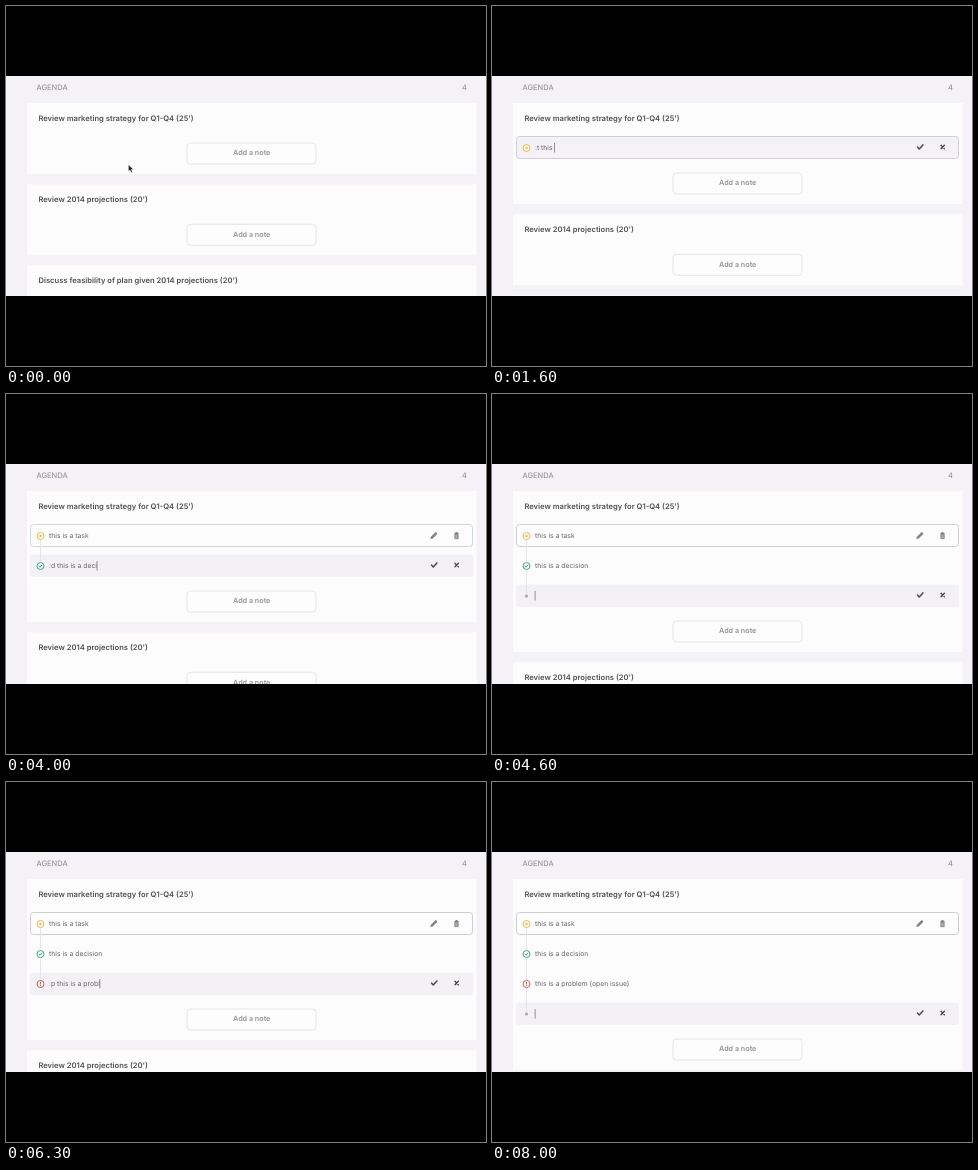
An HTML page for the animation above (8.1 s loop, 480 by 360 pixels).

```html
<!DOCTYPE html>
<html lang="en">
<head>
<meta charset="utf-8">
<title>Agenda notes</title>
<style>
  html, body { margin: 0; width: 100%; height: 100%; overflow: hidden; background: #000; }
  svg { display: block; width: 480px; height: 360px; }
  text { font: 400 6.8px Inter, Lato, sans-serif; fill: #636366; white-space: pre; text-rendering: geometricPrecision; }
  .title { font-weight: 600; font-size: 7.62px; fill: #505054; }
  .add { font-weight: 600; font-size: 7.2px; fill: #939397; text-anchor: middle; }
  .label { font-size: 7.5px; fill: #89878d; }
  .line { fill: none; stroke-linecap: round; stroke-linejoin: round; }
</style>
</head>
<body>
<svg id="stage" viewBox="0 0 480 360"></svg>
<script>
const LOOP = 8100, OPEN = 500, ROW = 30;
const stage = document.getElementById('stage');
const pen = document.createElement('canvas').getContext('2d');

// keys: [time, characters typed]; enter: time the note is saved
const notes = [
  { typed: ':t this is a task', color: '#e9b850', enter: 2400,
    mark: '<circle r="1.2" fill="#e9b850"/>',
    keys: [[1220, 0], [1600, 8.1], [2120, 17]] },
  { typed: ':d this is a decision', color: '#3fa88a', enter: 4400,
    mark: '<path class="line" d="M-1.5 0l1.1 1.2 1.9-2.2" stroke="#3fa88a"/>',
    keys: [[2930, 0], [4000, 17.2], [4260, 21]] },
  { typed: ':p this is a problem (open issue)', color: '#d65f5d', enter: 7700,
    mark: '<path class="line" d="M0-1.7v1.8M0 1.6v.1" stroke="#d65f5d"/>',
    keys: [[4850, 0], [5600, 7.2], [6300, 18.2], [6580, 21], [6780, 21], [7560, 33]] },
];
const titles = [
  "Review marketing strategy for Q1-Q4 (25')",
  "Review 2014 projections (20')",
  "Discuss feasibility of plan given 2014 projections (20')",
];

const text = (x, y, s, cls = '') => `<text x="${x}" y="${y}" class="${cls}">${s}</text>`;
const box = (x, y, w, h, fill, r = 0, stroke = 'none') =>
  `<rect x="${x}" y="${y}" width="${w}" height="${h}" rx="${r}" fill="${fill}" stroke="${stroke}"/>`;
const at = (x, y, s) => `<g transform="translate(${x} ${y})">${s}</g>`;

const tick = '<path class="line" d="M-2.7 0l1.8 1.9 3.6-4" stroke="#4a4a4d" stroke-width="1.5"/>';
const cross = '<path class="line" d="M-1.7-1.7l3.4 3.4m0-3.4l-3.4 3.4" stroke="#4a4a4d" stroke-width="1.4"/>';
const pencil = '<path d="M-3.7 3.6l.6-2.4 4.3-4.3q.5-.5 1-.1l.9.9q.4.5-.1 1l-4.3 4.3z" fill="#828286"/>';
const trash = '<path d="M-2.2-2.5h4.4v1h-4.4zM-1-3.6h2v1h-2z" fill="#828286"/>' +
  '<path d="M-1.7-1h3.4v4.2h-3.4z" fill="#aaa" stroke="#828286" stroke-width=".8"/>';
const arrow = '<path d="M0 0v7.2l1.7-1.5 1.2 2.6 1.4-.6-1.2-2.6h2.3z" fill="#222" stroke="#fff" stroke-width=".6"/>';
const dot = '<circle r="1.6" fill="#a9a9ad"/>';
const badge = note =>
  `<circle r="3.5" fill="#fdfdfd" stroke="${note.color}"/>` + note.mark;

function typedCount(keys, t) {
  if (t <= keys[0][0]) return 0;
  const i = keys.findIndex(k => k[0] > t);
  if (i < 0) return keys[keys.length - 1][1];
  const [t0, n0] = keys[i - 1], [t1, n1] = keys[i];
  return Math.floor(n0 + (n1 - n0) * (t - t0) / (t1 - t0));
}

function savedRow(note, i) {
  const y = 141.5 + ROW * i;
  return at(34.5, y + .5, badge(note)) + text(43, y + 2.3, note.typed.slice(3));
}

function draftRow(done, t) {
  const y = 141.5 + ROW * done, note = notes[done];
  const count = note ? typedCount(note.keys, t) : 0;
  const draft = note ? note.typed.slice(0, count) : '';
  const since = t - (done ? notes[done - 1].enter : OPEN);
  pen.font = '400 6.8px Inter, Lato, sans-serif';
  const caretX = 42.7 + pen.measureText(draft).width;
  const caret = count || since % 1000 < 500 ? box(caretX, y - 4.5, .8, 9.5, '#77777b') : '';
  return at(34.5, y + .5, count > 1 ? badge(note) : dot) + text(43, y + 2.3, draft) + caret +
    at(428.2, y - .5, tick) + at(450.7, y - .5, cross);
}

function noteRows(done, t) {
  const y = 141.5 + ROW * done;
  let s = '';
  if (done) {
    s += box(24.5, 130.5, 442, 22, '#fdfdfd', 3, done === 1 ? '#cbdad8' : '#cecdd1');
    s += box(24, y - 11, 443, 22.5, '#f3f1f5', 3);
    s += `<path d="M34.5 142V${y}" stroke="#e0e0e1" stroke-width=".8"/>`;
    s += at(428, 141.5, pencil) + at(450.5, 141.5, trash);
  } else {
    s += box(24.5, 130.5, 442, 22, '#f4f2f6', 3, '#cfced3');
  }
  return s + notes.slice(0, done).map(savedRow).join('') + draftRow(done, t);
}

function card(title, y, extra) {
  const by = y + 40 + extra;
  return box(21, y, 449.5, 71 + extra, '#fcfcfc') + text(32.4, y + 17.5, title, 'title') +
    box(181, by, 129, 21, '#fdfdfd', 3.5, '#e6e5e8') + text(245.7, by + 12.2, 'Add a note', 'add');
}

function pointer(t) {
  if (t > 850) return '';
  const p = Math.min(1, Math.max(0, (t - 50) / 420)), e = p * p * (3 - 2 * p);
  return at(122.3 + 122 * e, 158.5 - 11 * e, arrow);
}

function draw(t) {
  const done = notes.filter(n => t >= n.enter).length;
  const open = t >= OPEN, extra = open ? ROW * (done + 1) : 0;
  stage.innerHTML = box(0, 70, 480, 220, '#f4f2f6') +
    text(30.6, 84.3, 'AGENDA', 'label') + text(456, 84.3, '4', 'label') +
    titles.map((s, i) => card(s, 97 + 81.3 * i + (i ? extra : 0), i ? 0 : extra)).join('') +
    (open ? noteRows(done, t) : '') + pointer(t) +
    box(0, 0, 480, 70, '#000') + box(0, 290, 480, 70, '#000');
}

function frame() {
  draw(performance.now() % LOOP);
  requestAnimationFrame(frame);
}
frame();
</script>
</body>
</html>
```
